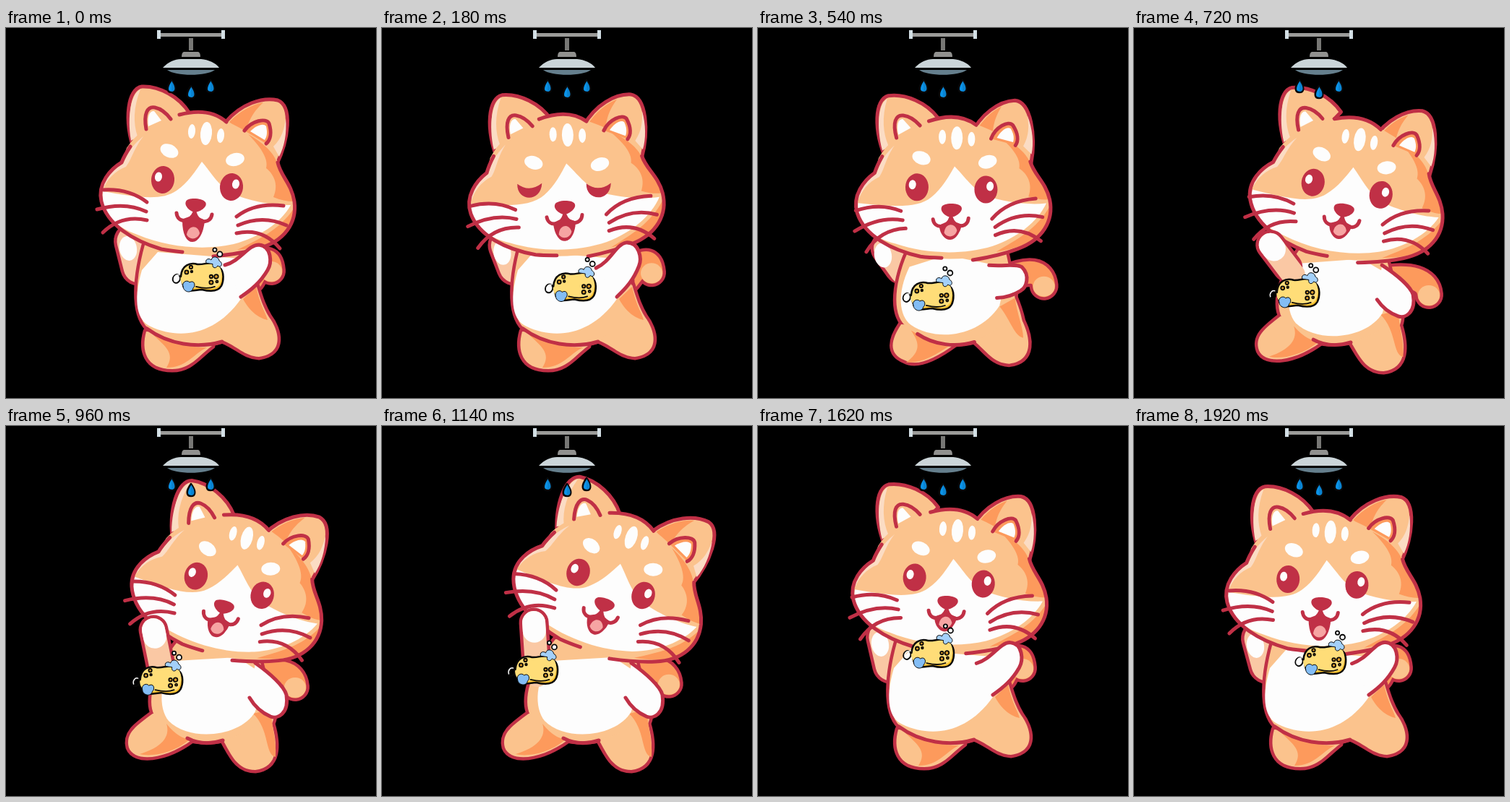
These frames come from a looping animation (512 by 512 pixels, 1.98 s). An HTML page with a canvas:

```html
<!DOCTYPE html>
<html>
<head>
<meta charset="utf-8">
<style>
html, body { margin: 0; width: 100%; height: 100%; overflow: hidden; background: #000; }
canvas { display: block; width: 100vmin; height: 100vmin; }
</style>
</head>
<body>
<canvas id="stage" width="512" height="512"></canvas>
<script>
const ctx = document.getElementById('stage').getContext('2d');
const LOOP = 1980, STEP = 60, DEG = Math.PI / 180;
const RED = '#c03046', FUR = '#fbc38d', DARK = '#fd9a5c', PALE = '#fbdcc4', WHITE = '#fdfdfd', INK = '#080808';

// time, nose x, y, tilt, stance (0 left, 1 right), left ear, right ear, mouth, tail x, y, paw x, y
const KEYS = [
  [0, 262, 245, 0, 0, 0, 0, 1, 367, 336, 175, 295],
  [360, 249, 251, -10, 0, 5, -9, 0.72, 381, 343, 172, 305],
  [720, 290, 252, 4.3, 0.95, -7, -12, 0.65, 408, 369, 189, 300],
  [960, 301, 250, 10.2, 1, 0, -4, 0.75, 400, 361, 204, 282],
  [1150, 307, 247, 13.5, 1, 0, 0, 0.75, 397, 357, 210, 272],
  [1380, 296, 251, 7.1, 1, -6, -8, 0.7, 407, 370, 200, 288],
  [1620, 262, 244, -0.6, 0, -4, -8, 0.65, 366, 335, 175, 292],
  [1770, 245, 250, -11, 0, 5, -8, 0.72, 378, 342, 170, 305],
  [1920, 259, 246, -1.3, 0, 0, 0, 1, 366, 335, 174, 294]
];

function keyAt(i) {
  const n = KEYS.length, turn = Math.floor(i / n);
  const row = KEYS[i - turn * n].slice();
  row[0] += turn * LOOP;
  return row;
}

// smooth curve through the keys
function poseAt(t) {
  let i = KEYS.length - 1;
  while (KEYS[i][0] > t) i--;
  const [a, b, c, d] = [-1, 0, 1, 2].map(n => keyAt(i + n));
  const span = c[0] - b[0], u = (t - b[0]) / span;
  return b.map((v, j) => {
    const m0 = (c[j] - a[j]) / (c[0] - a[0]) * span;
    const m1 = (d[j] - b[j]) / (d[0] - b[0]) * span;
    return v + u * m0 + u * u * (3 * (c[j] - v) - 2 * m0 - m1) + u * u * u * (2 * (v - c[j]) + m0 + m1);
  });
}

function shape(d, fill, stroke, width = 5) {
  const p = new Path2D(d);
  if (fill) { ctx.fillStyle = fill; ctx.fill(p); }
  if (stroke) { ctx.strokeStyle = stroke; ctx.lineWidth = width; ctx.stroke(p); }
}

const lines = list => list.forEach(d => shape(d, null, RED));

function oval(x, y, rx, ry, fill, tilt = 0, stroke, width) {
  const p = new Path2D();
  p.ellipse(x, y, rx, ry, tilt * DEG, 0, 7);
  shape(p, fill, stroke, width);
}

function turned(x, y, angle, draw) {
  ctx.save();
  ctx.translate(x, y);
  ctx.rotate(angle * DEG);
  ctx.translate(-x, -y);
  draw();
  ctx.restore();
}

// blend two paths that have the same commands
function blend(a, b, k) {
  const to = b.match(/\d+/g);
  let i = 0;
  return a.replace(/\d+/g, n => +n + (to[i++] - n) * k);
}

function tail(x, y) {
  const d = `M340 348Q${x - 3} ${y - 32} ${x} ${y}`;
  shape(d, null, RED, 40);
  shape(d, null, DARK, 31);
  oval(x, y + 1, 15, 14, FUR);
}

function body(k) {
  const parts = [
    ['M194 420C187 445 193 472 230 472C255 472 265 455 285 440L250 425Z',
     'M203 398C180 415 165 425 170 445C178 466 220 462 258 434L255 400Z'],
    ['M299 432C320 440 330 454 350 455C387 450 377 417 364 400C356 387 352 375 346 355L310 400Z',
     'M301 436C312 455 320 476 345 476C378 472 376 440 368 412C372 402 372 400 364 388L320 400Z'],
    ['M195 290C178 345 176 395 196 415C225 440 270 442 300 432C340 410 345 380 345 350L335 290Z',
     'M240 295C203 340 195 380 205 400C225 435 270 440 300 434C345 425 365 400 368 390L345 300Z']
  ].map(([a, b]) => blend(a, b, k));
  parts.forEach(d => shape(d, null, RED, 9));
  parts.forEach(d => shape(d, FUR));
  shape(blend('M328 375L346 358C352 385 360 395 362 404C352 402 338 394 328 375Z',
              'M342 398L367 392C366 410 375 435 373 458C358 455 365 420 342 398Z', k), DARK);
  shape(blend('M203 424C240 440 262 442 278 442C258 452 250 470 222 470C235 450 220 440 203 424Z',
              'M222 412C235 428 245 432 254 434C230 454 200 458 185 454C215 445 228 430 222 412Z', k), DARK);
  shape(blend('M188 335C175 380 182 405 200 413C240 432 290 425 325 375L335 320L210 310Z',
              'M235 325C212 350 210 390 225 408C255 438 325 430 345 395L358 345L320 320Z', k), WHITE);
  shape(blend('M195 416C225 438 265 444 299 434', 'M251 432C266 440 284 440 300 435', k), null, RED);
}

function leftArm(x, y, k) {
  const ex = 184 + 30 * k, ey = 331, w = 43 - 11 * k;
  const over = 1 + 14 * k / Math.hypot(ex - x, ey - y);
  const arm = f => `M${x} ${y}L${x + (ex - x) * f} ${y + (ey - y) * f}`;
  shape(arm(1), null, RED, w + 9);
  shape(arm(over), null, '#fac8a4', w);
  if (k > 0.5) shape(arm(0.2), null, WHITE, w);
  else oval(x - 6, y + 10, 12, 17, WHITE, -10);
}

function rightArm(k, tilt) {
  turned(325, 372, tilt * 1.5 * (1 - k), () =>
    shape(blend('M303 328C325 322 335 300 350 300C368 302 368 325 362 335C352 352 340 362 325 372',
                'M345 328C365 342 385 360 388 372C392 398 376 406 366 402C352 396 344 388 337 376', k), WHITE, RED));
}

function eye(x, y, shine, closed) {
  if (closed) {
    const d = `M${x - 17} ${y - 2}Q${x} ${y + 10} ${x + 17} ${y - 4}C${x + 17} ${y + 23} ${x - 17} ${y + 23} ${x - 17} ${y - 2}Z`;
    turned(x, y, 8, () => shape(d, RED));
  } else {
    oval(x, y, 16, 19, RED, 5);
    oval(x + shine, y - 4, 5, 6.5, WHITE, 10);
  }
}

function head(tilt, leftEar, rightEar, mouth) {
  const closed = tilt < -5, browY = closed ? 9 : 0;
  // the whiskers swing while the mouth closes
  const swing = (mouth - 1) * 33;
  const onLeftEar = draw => turned(185, 160, leftEar, draw);
  const onRightEar = draw => turned(368, 175, rightEar, draw);

  onLeftEar(() => {
    shape('M178 172C162 125 169 84 188 81C212 80 240 95 254 118L220 150Z', FUR, RED);
    shape('M173 156C167 120 174 90 186 85C176 110 176 132 182 150Z', PALE);
  });
  onRightEar(() => {
    shape('M304 130C325 105 355 95 376 100C397 108 391 155 374 190L340 170Z', FUR, RED);
    shape('M309 130C325 114 340 106 356 103C340 118 335 130 330 150Z', DARK);
    shape('M387 125C389 145 385 165 378 178L370 164C382 152 385 140 387 125Z', PALE);
  });

  shape('M167 166C185 140 215 120 254 118C275 114 290 118 305 129C340 145 370 165 378 190C380 205 395 215 399 240C403 270 385 295 350 305C310 315 255 316 215 306C175 294 140 272 132 240C126 215 145 195 160 186Z', FUR);
  shape('M335 147C362 162 374 178 377 192C380 206 394 216 398 240C388 240 380 238 370 234C378 216 370 202 360 194C364 180 350 162 335 147Z', DARK);
  shape('M398 250C400 272 385 292 352 302C340 305 330 306 320 307C350 292 378 280 398 250Z', DARK);
  shape('M135 222C135 208 150 194 162 188C170 168 178 160 190 150C176 168 174 182 166 192C150 198 140 210 135 222Z', PALE);
  shape('M271 185C262 198 252 214 236 225C215 240 180 234 134 226C130 255 150 275 182 286C225 304 275 308 315 299C350 290 380 270 394 245C365 246 335 238 314 230C295 220 284 200 271 185Z', WHITE);

  onLeftEar(() => {
    shape('M194 140C190 118 196 108 206 110C216 112 222 118 228 126', FUR, RED);
    shape('M197 136C195 122 199 114 205 115L215 128Z', WHITE);
  });
  onRightEar(() => {
    shape('M330 142C340 128 360 124 364 132C368 145 366 155 360 160', DARK, RED);
    shape('M338 143C346 135 356 131 360 136C362 145 361 150 358 155Z', WHITE);
  });

  lines([
    'M240 120C270 112 290 117 305 130',
    'M376 186C380 205 395 215 399 240C403 270 385 295 350 305C330 311 308 314 287 316',
    'M244 310C234 309 225 308 215 306C175 294 140 272 132 240C126 215 145 195 160 186Q164 176 172 164'
  ]);
  turned(195, 254, swing, () =>
    lines(['M195 241Q170 222 135 224', 'M194 254Q165 240 126 251', 'M195 266Q160 258 134 283']));
  turned(319, 273, swing * 0.7, () =>
    lines(['M319 261Q345 241 384 246', 'M321 273Q355 258 388 273', 'M319 284Q355 276 379 305']));

  oval(257, 143, 5, 10, WHITE, 5);
  oval(277, 146, 8, 16, WHITE, 5);
  oval(297, 149, 5, 10, WHITE, 5);
  oval(226, 170 + browY, 13, 9, WHITE, 25);
  oval(317, 182 + browY, 13, 9, WHITE, -12);
  eye(217, 210, -6, closed);
  eye(312, 220, 6, closed);

  const low = 264 + 30 * mouth;
  shape(`M246 266C246 ${low - 8} 252 ${low} 258 ${low}C265 ${low} 271 ${low - 10} 273 267L260 261Z`, RED, RED, 4);
  shape(`M250 ${low - 8}C252 ${low - 22} 266 ${low - 22} 268 ${low - 10}C265 ${low - 1} 254 ${low} 250 ${low - 8}Z`, '#f6a5a3');
  lines(['M236 256C237 269 254 271 261 255C266 272 283 271 285 258']);
  shape('M249 240C251 234 272 235 276 241C280 248 267 255 261 255C255 254 246 246 249 240Z', RED);
}

function drop(x, y) {
  shape(`M${x} ${y - 9}C${x + 8} ${y + 2} ${x + 6} ${y + 8} ${x} ${y + 8}C${x - 6} ${y + 8} ${x - 8} ${y + 2} ${x} ${y - 9}Z`, '#0b93e8', INK, 2.5);
  shape(`M${x} ${y - 8}C${x + 7} ${y + 2} ${x + 5} ${y + 7} ${x} ${y + 7}Z`, '#0a84d2');
}

function shower() {
  shape('M213 7H299V12H213Z', '#9b9b99');
  shape('M209 3H214V15H209ZM298 3H303V15H298Z', '#d3dfe5');
  shape('M253 14H259V31H253Z', '#777775');
  shape('M246 33H266Q269 34 269 40H243Q243 34 246 33Z', '#91918f');
  shape('M217 55C224 47 234 43 242 43H270C280 44 290 48 295 55Z', '#cbd5d9');
  shape('M223 58H289C278 67 234 67 223 58Z', '#657f8d');
}

function sponge(t) {
  const a = (4 + t * 0.1635) * DEG;
  ctx.save();
  ctx.translate(242 + 29 * Math.cos(a), 342 + 28 * Math.sin(a));
  oval(-35, 3, 5, 6, null, 20, INK, 2);
  shape('M-38 6A5 6 0 0 1 -32 -2', null, WHITE, 1.5);
  const d = 'M-29 -2C-28 -16 -16 -20 -6 -17C4 -16 12 -22 22 -16C30 -10 28 4 25 10C20 19 6 17 -2 15C-10 15 -20 20 -26 12C-29 8 -30 4 -29 -2Z';
  ctx.save();
  ctx.translate(2, 3);
  shape(d, '#ffc22e', INK, 2.5);
  ctx.restore();
  shape(d, '#ffdd78');
  shape('M-29 0C-28 -16 -16 -20 -6 -17C4 -16 12 -22 22 -16', null, INK, 2.5);
  shape('M-8 14Q8 18 18 14', null, INK, 1.8);
  [[-21, -6, 2.5], [-15, -13, 2.2], [-14, -7, 1.3], [13, 0, 2.2], [20, 0, 2.8], [13, 8, 2.6], [21, 7, 1.5]]
    .forEach(([x, y, r]) => oval(x, y, r, r, '#d99a2b', 0, INK, 1.8));
  shape('M-26 14C-28 7 -20 4 -17 8C-10 4 -8 13 -12 16C-14 24 -25 22 -26 14Z', '#83bdf5', INK, 1);
  shape('M6 -19C4 -24 10 -26 13 -23C15 -30 24 -27 24 -22C31 -18 26 -11 22 -15C19 -10 14 -12 15 -17Z', '#a3d0fa', INK, 1);
  oval(18, -37, 2.6, 2.6, WHITE, 0, INK, 1.8);
  oval(25, -31, 3.5, 3.5, WHITE, 0, INK, 1.8);
  ctx.restore();
}

function draw(t) {
  const [, x, y, tilt, stance, leftEar, rightEar, mouth, tx, ty, px, py] = poseAt(t);
  const k = Math.min(1, Math.max(0, stance));
  ctx.fillStyle = '#000';
  ctx.fillRect(0, 0, 512, 512);
  ctx.lineCap = ctx.lineJoin = 'round';
  tail(tx, ty);
  if (k < 0.5) leftArm(px, py, k);
  body(k);
  ctx.save();
  ctx.translate(x - 262, y - 245);
  turned(262, 245, tilt, () => head(tilt, leftEar, rightEar, mouth));
  ctx.restore();
  rightArm(k, tilt);
  if (k >= 0.5) leftArm(px, py, k);
  drop(229, 81);
  drop(256, 89);
  drop(283, 81);
  shower();
  sponge(t);
}

const start = performance.now();
function tick() {
  const t = (performance.now() - start) % LOOP;
  draw(Math.floor(t / STEP) * STEP);
  requestAnimationFrame(tick);
}
tick();
</script>
</body>
</html>
```
